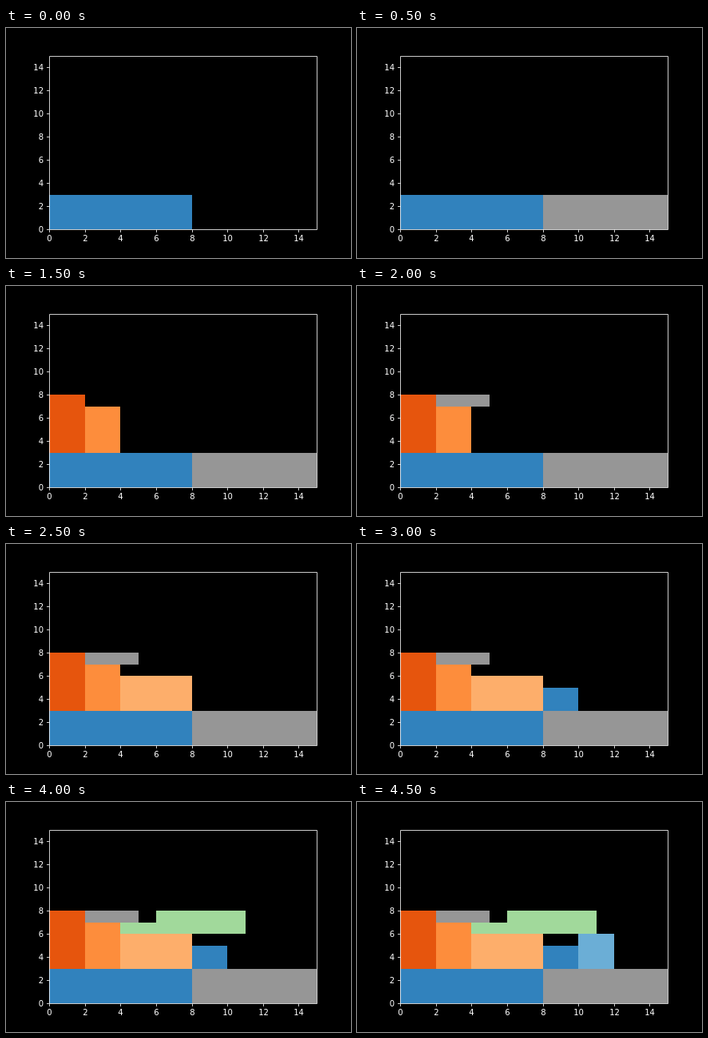
Recreate the animation shown at these times as an HTML page. Size 432x288 px, loop 5 s.

```html
<!DOCTYPE html>
<html lang="en">
<head>
<meta charset="utf-8">
<title>Stacking rectangles</title>
<style>
html, body { margin: 0; width: 100%; height: 100%; overflow: hidden; background: #000; }
svg { display: block; width: 432px; height: 288px; }
.axes { fill: none; stroke: #fff; stroke-width: .8; }
text { font: 10px "DejaVu Sans", sans-serif; fill: #fff; }
</style>
</head>
<body>
<svg viewBox="0 0 432 288">
  <g id="blocks" shape-rendering="crispEdges"></g>
  <g id="axes"></g>
</svg>
<script>
const STEP = 500;
const SIZE = 15;
const blue = '#3182bd', lightBlue = '#6baed6', grey = '#969696', green = '#a1d99b';
const orange = '#e6550d', midOrange = '#fd8d3c', paleOrange = '#fdae6b';

// x, y, width, height in axis units, in order of appearance
const BLOCKS = [
  [0, 0, 8, 3, blue],
  [8, 0, 7, 3, grey],
  [0, 3, 2, 5, orange],
  [2, 3, 2, 4, midOrange],
  [2, 7, 3, 1, grey],
  [4, 3, 4, 3, paleOrange],
  [8, 3, 2, 2, blue],
  [4, 6, 2, 1, green],
  [6, 6, 5, 2, green],
  [10, 3, 2, 3, lightBlue]
];

const px = x => Math.round(54 + x * 22.32);
const py = y => Math.round(252 - y * 14.496);

function add(parentId, tag, attrs, content = '') {
  const el = document.createElementNS('http://www.w3.org/2000/svg', tag);
  for (const key in attrs) el.setAttribute(key, attrs[key]);
  el.textContent = content;
  return document.getElementById(parentId).appendChild(el);
}

function drawAxes() {
  const left = px(0) + .5, right = px(SIZE) + .5;
  const top = py(SIZE) + .5, bottom = py(0) + .5;
  let path = `M${left} ${top}H${right}V${bottom}H${left}Z`;
  for (let v = 0; v < SIZE; v += 2) {
    const x = px(v) + .5, y = py(v) + .5;
    path += `M${x} ${bottom}v3.5M${left} ${y}h-3.5`;
    add('axes', 'text', { x, y: 267, 'text-anchor': 'middle' }, v);
    add('axes', 'text', { x: 47, y: py(v) + 4, 'text-anchor': 'end' }, v);
  }
  add('axes', 'path', { class: 'axes', d: path });
}

drawAxes();

BLOCKS.forEach(([x, y, w, h, fill], i) => {
  const left = px(x), top = py(y + h);
  const rect = add('blocks', 'rect', {
    x: left, y: top, width: px(x + w) - left, height: py(y) - top, fill
  });
  if (!i) return;
  const offset = i / BLOCKS.length;
  rect.animate([
    { opacity: 0, offset: 0 },
    { opacity: 0, offset },
    { opacity: 1, offset },
    { opacity: 1, offset: 1 }
  ], { duration: STEP * BLOCKS.length, iterations: Infinity });
});
</script>
</body>
</html>
```
